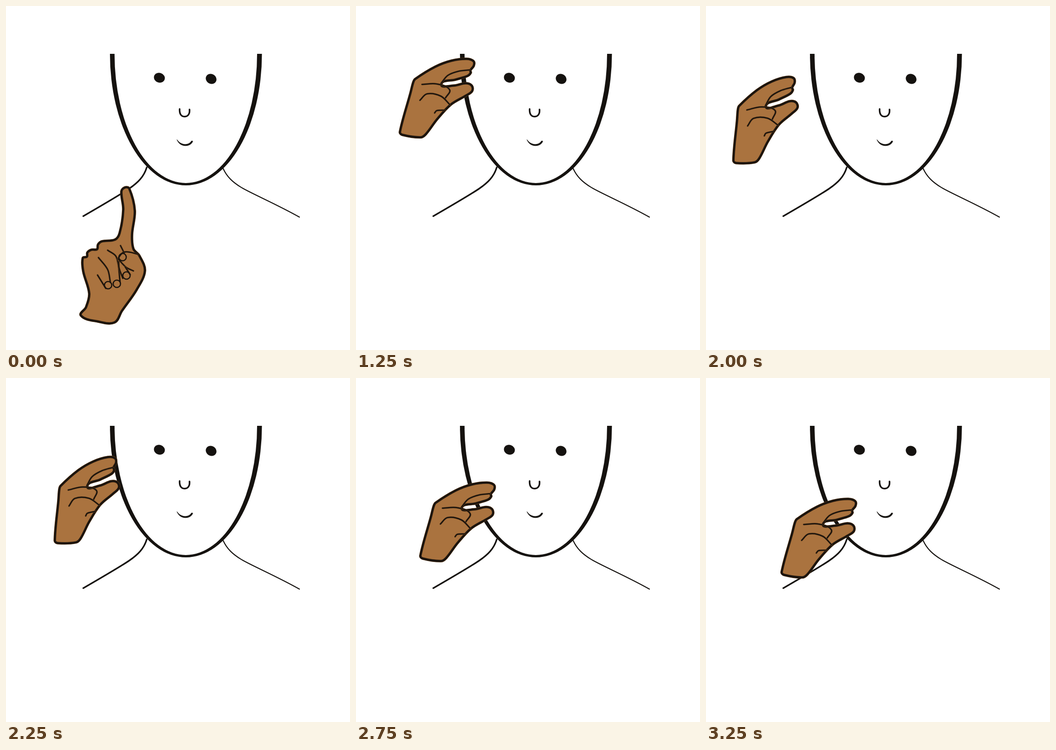
An HTML page for the animation above (3.5 s loop, 748 by 748 pixels).

```html
<!DOCTYPE html>
<html lang="en">
<head>
<meta charset="utf-8">
<title>Hand sign beside a face</title>
<style>
  html, body { margin: 0; width: 100%; height: 100%; overflow: hidden; background: #fff; }
  svg { display: block; width: 100%; height: 100%; }
  path { stroke-linecap: round; stroke-linejoin: round; }
</style>
</head>
<body>
<svg id="stage" viewBox="0 0 748 748">
  <g fill="none" stroke="#15120f">
    <path fill="#15120f" stroke="none" d="M226 104H236A155 281 0 0 0 546 104H556.500A165.250 286 0 0 1 226 104Z"/>
    <g fill="#15120f" stroke="none">
      <ellipse rx="12" ry="10.600" transform="translate(333.500 156) rotate(18)"/>
      <ellipse rx="12" ry="10.600" transform="translate(446 158.500) rotate(32)"/>
    </g>
    <path stroke-width="3.500" d="M377.500 224C377 235 381 240.500 388.500 240.500S400 234 399 225"/>
    <path fill="#15120f" d="M372 291C378 308 401 307 406 294.500Q405 292 403 294C397 303.500 381 304 372 291Z"/>
    <path stroke-width="3.400" d="M306 351C300 371 287 384 268 397S206 435 168 457"/>
    <path stroke-width="2.200" d="M472 353C480 371 493 384 516 397S590 432 638 459"/>
  </g>
</svg>
<script>
const NS = "http://www.w3.org/2000/svg";
const INK = "#1b140e", SKIN = "#aa733f", SHADE = "#68431f";
const stage = document.getElementById("stage");

function add(parent, name, attrs) {
  const el = document.createElementNS(NS, name);
  for (const key in attrs) el.setAttribute(key, attrs[key]);
  parent.appendChild(el);
  return el;
}

const parse = text => text.trim().split(/\s+/).map(p => p.split(",").map(Number));

// Smooth curve through key points; handles are a third of each segment
function spline(text, closed) {
  const pts = parse(text), n = pts.length;
  const at = i => closed ? pts[(i + n) % n] : pts[Math.max(0, Math.min(n - 1, i))];
  const handle = (i, reach) => {
    const [ax, ay] = at(i - 1), [bx, by] = at(i + 1), [x, y] = at(i);
    const k = reach / Math.hypot(bx - ax, by - ay);
    return [x + (bx - ax) * k, y + (by - ay) * k];
  };
  let d = "M" + pts[0];
  for (let i = 0; i < (closed ? n : n - 1); i++) {
    const [x, y] = at(i), [u, v] = at(i + 1);
    const reach = Math.hypot(u - x, v - y) / 3;
    d += `C${handle(i, reach)} ${handle(i + 1, -reach)} ${u},${v}`;
  }
  return closed ? d + "Z" : d;
}

// Dark line with a softer, wider edge
function softLine(parent, d, width, fill = "none") {
  add(parent, "path", { d, fill, stroke: SHADE, "stroke-width": width + 1.2 });
  add(parent, "path", { d, "stroke-width": width });
}

function makeHand(outline, creases, nails = "") {
  const g = add(stage, "g", { fill: "none", stroke: INK });
  softLine(g, spline(outline, true), 4.4, SKIN);
  for (const points of creases) softLine(g, spline(points), 2.5);
  if (nails)
    for (const [cx, cy] of parse(nails))
      add(g, "circle", { cx, cy, r: 8, "stroke-width": 2.6 });
  return g;
}

const pointing = makeHand(
  `259,394.5 251,403 255,443 247,494 237,508 208,512 200,519 198,529 186,530
   177,536 176,545 167,548 168,577 181,625 174,655 163,673 200,686 236,688
   252,663 284,617 302,576 290,543 277,528 274,497 280,445 268,397`,
  [
    "201,547 221,573 227,601", "221,531 240,546 248,599", "249,521 257,537",
    "242,551 257,535 289,540", "244,550 261,568 277,576",
    "245,556 246,570 254,592", "259,567 270,584", "199,585 217,614"
  ],
  "253.5,546 222,607 241,604 262,586"
);

const pinch = makeHand(
  `134,149 178,122 213,109 246,105 261,110 261.5,120 254,130 255,135 248,142
   222,150 191,160 219,163 244,158 257,163 258,175 244,185 212,204 182,236
   157,269 146,275.5 106,270 101,264 124,179 130,156`,
  [
    "190,159 205,141 228,132 253,129", "149,160.5 181,159.5 209,172 200,190",
    "144.5,195 160,181 190,186 210,205", "176.5,222.5 181,217.5 200,216.5"
  ]
);

const HOLD = 750, STEP = 250, LOOP = 3500;
const path = parse(`0,0 0,8 -5.5,10 -32,10.5 -52,47.5 -62,68.5 -15.5,86
                    24,108.5 39,122.5 55,143.5 63.5,158`);

function draw(time) {
  const t = time % LOOP;
  const isPointing = t < HOLD;
  pointing.setAttribute("visibility", isPointing ? "visible" : "hidden");
  pinch.setAttribute("visibility", isPointing ? "hidden" : "visible");
  if (isPointing) return;
  const step = Math.floor((t - HOLD) / STEP);
  const turn = step > 3 && step < 7 ? -10 : 0; // the wrist tilts on the outward swing
  pinch.setAttribute("transform", `translate(${path[step]}) rotate(${turn} 133 148)`);
}

const start = performance.now();
function tick() {
  draw(performance.now() - start);
  requestAnimationFrame(tick);
}
tick();
</script>
</body>
</html>
```
